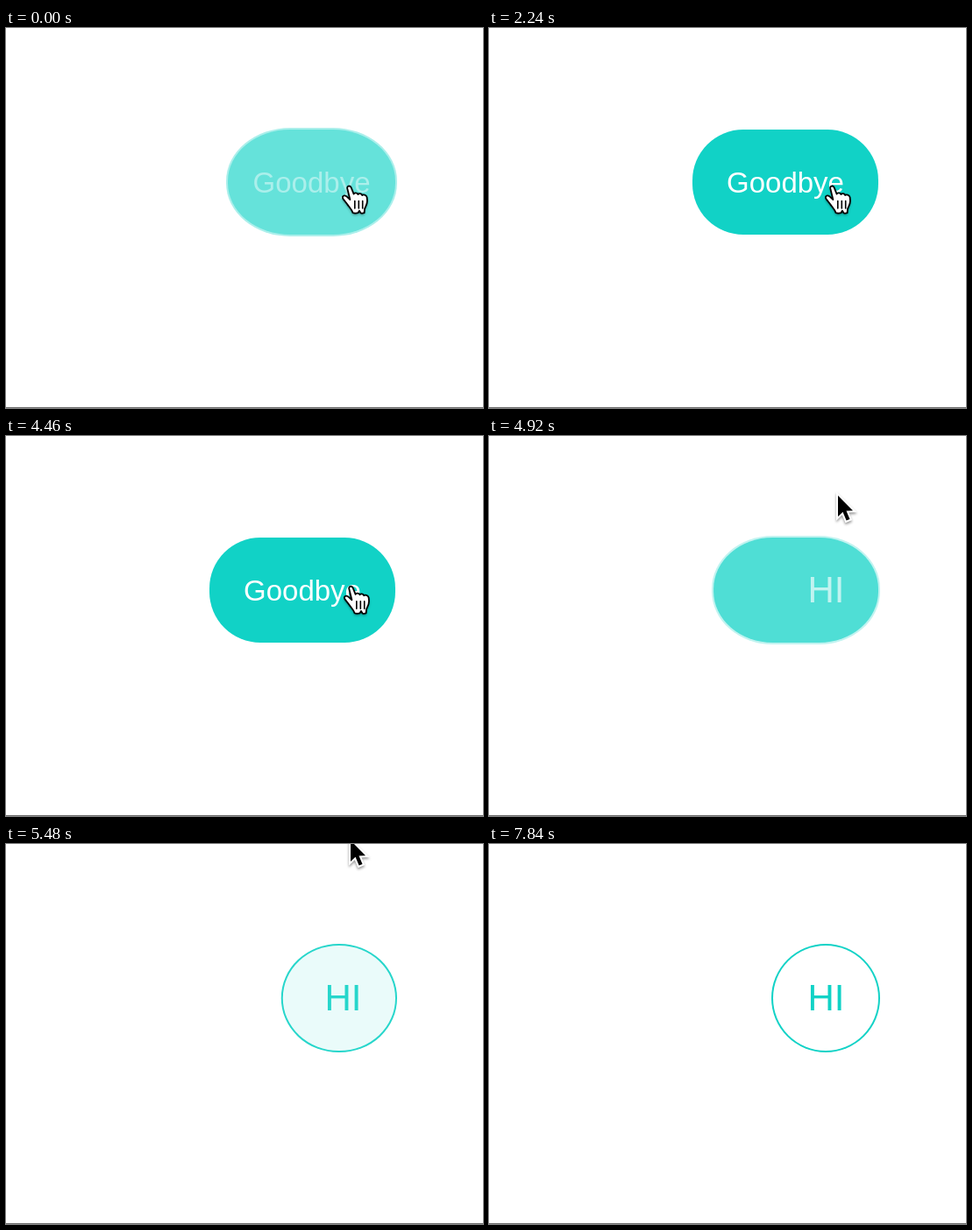
An HTML page with a canvas for the animation above (8.58 s loop, 544x434 px).

```html
<!DOCTYPE html>
<html lang="en">
<head>
<meta charset="utf-8">
<title>Hover button</title>
<style>
  html, body { margin: 0; width: 100%; height: 100%; overflow: hidden; background: #fff; }
  canvas { display: block; }
</style>
</head>
<body>
<canvas id="stage" width="544" height="434"></canvas>
<script>
const ctx = document.getElementById('stage').getContext('2d');
const LOOP = 8580;
const LEAVE = 4692;
const TEAL = [17, 210, 198];
const WHITE = [255, 255, 255];
const FONT = '"Liberation Sans", Arial, sans-serif';

const lerp = (a, b, p) => a + (b - a) * p;
const mix = (a, b, p) => `rgb(${a.map((v, i) => Math.round(lerp(v, b[i], p))).join()})`;

// CSS "ease": cubic-bezier(.25, .1, .25, 1)
function ease(x) {
  if (x <= 0) return 0;
  if (x >= 1) return 1;
  const bez = (a, b, s) => 3 * a * s * (1 - s) ** 2 + 3 * b * s * s * (1 - s) + s ** 3;
  let lo = 0, hi = 1;
  for (let i = 0; i < 24; i++) {
    const s = (lo + hi) / 2;
    if (bez(0.25, 0.25, s) < x) lo = s; else hi = s;
  }
  return bez(0.1, 1, lo);
}

// Keys are [time, x, y]
function along(keys, t) {
  if (t <= keys[0][0]) return keys[0].slice(1);
  for (let i = 1; i < keys.length; i++) {
    const [t0, x0, y0] = keys[i - 1], [t1, x1, y1] = keys[i];
    if (t < t1) {
      const p = (t - t0) / (t1 - t0);
      return [lerp(x0, x1, p), lerp(y0, y1, p)];
    }
  }
  return keys[keys.length - 1].slice(1);
}

const handKeys = [
  [2240, 383, 180], [2400, 383, 179], [2660, 383, 179], [3500, 383, 177],
  [3760, 385, 171.5], [4460, 385, 171.5], [LEAVE, 389, 113]
];
const arrowKeys = [
  [LEAVE, 398, 113], [4920, 398, 68], [5300, 395, 26], [5480, 393, -4], [5700, 390, -46]
];

const hand = new Path2D(
  'M6.3 3.4C5.4 .4 9.2 -.6 10.6 2.2L13.6 9.6C14 7.8 17.9 7.9 18.4 10.1' +
  'C19.2 8.6 22.7 8.9 23.2 11C24.4 9.9 27.9 10.3 28.6 13.2L29 17.2' +
  'C29 21.8 27 23.8 26 26.8L25.6 31.2C23.6 31.9 22.6 31.8 21.5 31.2' +
  'L20 28.6L18.4 31.2C16.2 31.7 14 31.7 12.5 31C11.4 27.2 8 24.2 6 21' +
  'L1.6 15.4C-.4 12.4 2.4 10.2 5.2 12.2L9.4 16Z');
const arrow = new Path2D(
  'M0 0L0 24L5.5 18.8L9.6 28.6L13.5 27L9.5 17.4L17 17.2Z');
const creases = new Path2D('M14.8 17.5V26M19.3 17.5V26M23.7 17.5V26');

function shadow(on) {
  ctx.shadowColor = on ? 'rgba(0,0,0,.4)' : 'transparent';
  ctx.shadowBlur = on ? 3 : 0;
  ctx.shadowOffsetY = on ? 2 : 0;
}

function drawHand(x, y) {
  ctx.save();
  ctx.translate(x, y);
  ctx.lineJoin = ctx.lineCap = 'round';
  ctx.lineWidth = 1.8;
  ctx.strokeStyle = '#000';
  ctx.fillStyle = '#fff';
  shadow(true);
  ctx.fill(hand);
  shadow(false);
  ctx.stroke(hand);
  ctx.lineWidth = 1.6;
  ctx.stroke(creases);
  ctx.restore();
}

function drawArrow(x, y) {
  ctx.save();
  ctx.translate(x, y);
  ctx.lineWidth = 4;
  ctx.strokeStyle = '#fff';
  ctx.fillStyle = '#000';
  shadow(true);
  ctx.stroke(arrow);
  shadow(false);
  ctx.fill(arrow);
  ctx.restore();
}

function pill(x, y, w, h, rx, ry, color) {
  ctx.beginPath();
  ctx.roundRect(x, y, w, h, { x: rx, y: ry });
  ctx.fillStyle = color;
  ctx.fill();
}

function label(text, size, x, y, color) {
  ctx.font = `${size}px ${FONT}`;
  ctx.textAlign = 'center';
  ctx.fillStyle = color;
  ctx.fillText(text, x, y);
}

function drawButton(t) {
  const hover = t < LEAVE;
  const p = hover ? ease((t + 450) / 1200) : 1 - ease((t - LEAVE) / 1230);
  const w = lerp(hover ? 156.5 : 124, 216, p);
  const x = 446 - w;
  const rx = lerp(w / 2, 60, p), ry = lerp(62, 60, p);
  const ink = mix(TEAL, WHITE, p);
  pill(x, 114, w, 124, rx, ry, ink);
  pill(x + 2, 116, w - 4, 120, rx - 2, ry - 2, mix(WHITE, TEAL, p));
  if (hover) label('Goodbye', 33, x + w / 2, 188, ink);
  else label('HI', 42, 384.5, 190, ink);
}

function held(t) {
  for (const start of [4920, 5480]) if (t >= start && t < start + 100) return start;
  return t;
}

function draw(time) {
  const t = held(time);
  ctx.fillStyle = '#fff';
  ctx.fillRect(0, 0, 544, 434);
  ctx.fillStyle = '#6e6e6e';
  ctx.fillRect(0, 433, 544, 1);
  drawButton(t);
  if (t < LEAVE) drawHand(...along(handKeys, t));
  else if (t < 5700) drawArrow(...along(arrowKeys, t));
}

const begin = performance.now();
function tick() {
  draw((performance.now() - begin) % LOOP);
  requestAnimationFrame(tick);
}
tick();
</script>
</body>
</html>
```
